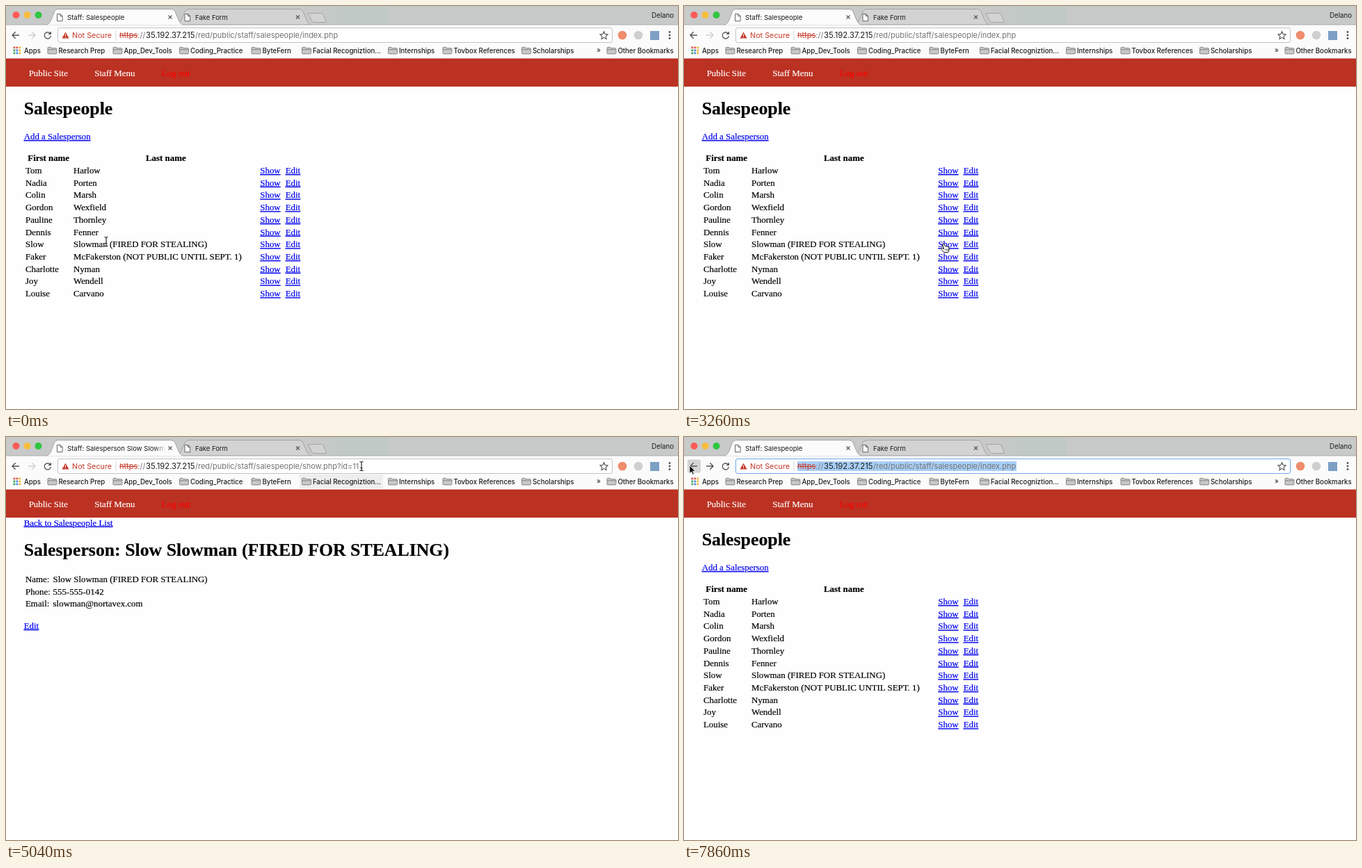
An HTML page for the animation above (8 s loop, 966 by 580 pixels).

```html
<!DOCTYPE html>
<html lang="en">
<head>
<meta charset="utf-8">
<title>Staff: Salespeople</title>
<style>
html, body { margin: 0; width: 100%; height: 100%; overflow: hidden; background: #fefefe; }
svg { display: block; width: 100vw; height: 100vh; }
text { white-space: pre; }
.ui { font-family: Inter, "Open Sans", sans-serif; fill: #1c1c1c; }
.page { font: 12.9px "Liberation Serif", "Times New Roman", serif; fill: #000; }
.page text { stroke: #000; stroke-width: .18px; }
.page .h1 { font-size: 25.8px; font-weight: bold; }
.page .th { font-weight: bold; }
.page .link { fill: #0000ee; stroke: #0000ee; text-decoration: underline; }
.page .nav { fill: #fff; stroke: #fff; }
.page .out { fill: #f00; stroke: #f00; }
</style>
</head>
<body>
<svg id="stage" viewBox="0 0 966 580" xmlns="http://www.w3.org/2000/svg"></svg>
<script>
const LOOP = 8000;
const stage = document.getElementById('stage');
const el = id => document.getElementById(id);

// Markup helpers
const rect = (x, y, w, h, fill, extra = '') =>
  `<rect x="${x}" y="${y}" width="${w}" height="${h}" fill="${fill}" ${extra}/>`;
const path = (d, extra = '') => `<path d="${d}" ${extra}/>`;
const dot = (x, y, r, fill) => `<circle cx="${x}" cy="${y}" r="${r}" fill="${fill}"/>`;
const text = (x, y, s, cls = '') => `<text x="${x}" y="${y}" class="${cls}">${s}</text>`;
const ui = (x, y, s, size, extra = '') =>
  `<text class="ui" x="${x}" y="${y}" font-size="${size}" ${extra}>${s}</text>`;
const group = (id, body, extra = '') => `<g id="${id}" ${extra}>${body}</g>`;
const line = (color, width = 1.2) => `fill="none" stroke="${color}" stroke-width="${width}"`;

const fileIcon = x => path(`M${x} 11.5h4.6l3 3v7.2h-7.6z M${x + 4.6} 11.5v3h3`,
  'fill="#fff" stroke="#555" stroke-width=".9"');
const closeIcon = x => path(`M${x - 2.5} 13.5l5 5m0-5l-5 5`, line('#555', 1.1));
const folder = x => path(`M${x} 60.5q0-1.2 1.2-1.2h3.3l1.2 1.4h6q1.2 0 1.2 1.2v6q0 1-1.2 1h-10.5q-1.2 0-1.2-1z
  M${x} 62.8h12.9`, 'fill="#c9c9c9" stroke="#7c7c7c" stroke-width=".9"');
const arrowIcon = (x, dir) =>
  path(`M${x - 5 * dir} 42h${10 * dir}m${-4.7 * dir}-4.7l${4.7 * dir} 4.7l${-4.7 * dir} 4.7`);

function tabStrip() {
  const lights = ['#fc5b57', '#f6be3b', '#2fc641'].map((c, i) => dot(14.5 + 16 * i, 13, 5, c)).join('');
  return rect(0, 0, 966, 28, '#c8c9c9') +
    rect(440, 0, 110, 27, 'url(#tint)') + lights +
    path('M244 27C249 27 250 24 252 20L257 8Q259 4.500 263 4.500H421Q425 4.500 427 8L432 20Q435 27 440 27Z',
      'fill="#d3d3d3" stroke="#a3a3a3"') +
    path('M436 10.500H453Q455 10.500 456 12L460 21.500Q461 23.500 459 23.500H443Q441 23.500 440 22L434.500 12Q434 10.500 436 10.500Z',
      'fill="#d3d3d3" stroke="#a3a3a3"') +
    rect(0, 26.5, 966, 1, '#a9a9a9') +
    path('M56 28C61 27 63 24 65 20L69.500 8Q71 4.500 75 4.500H237Q241 4.500 243 8L248 20Q251 27 257 28Z',
      'fill="#fbfbfb" stroke="#a3a3a3"') +
    fileIcon(73.5) + fileIcon(257) +
    `<g clip-path="url(#tabClip)">${ui(88, 19.6, '', 9.6, 'id="title"')}</g>` +
    rect(214, 9, 15, 15, 'url(#fade)') +
    ui(272, 19.6, 'Fake Form', 9.5) + closeIcon(236) + closeIcon(419.5) +
    ui(960, 17.2, 'Delano', 9.7, 'text-anchor="end"');
}

function toolbar() {
  return rect(0, 27.5, 966, 48.5, '#fbfbfb') +
    group('backHover', rect(5, 32.5, 19, 19, '#d4d4d4', 'rx="2"')) +
    group('back', arrowIcon(14, -1), line('#555', 1.4)) +
    group('forward', arrowIcon(37, 1), line('#555', 1.4)) +
    path('M63.300 39.300A4.600 4.600 0 1 0 64.400 43', line('#555', 1.4)) +
    path('M65 36.500v4.600h-4.600z', 'fill="#555"') +
    rect(74.5, 31.5, 797, 21, '#fff', 'id="field" rx="2.500" stroke="#c2c2c2"') +
    group('idSel', rect(498, 35, 10.5, 14, '#a9cff7')) +
    group('urlSel', rect(163, 35, 315, 14, '#a9cff7')) +
    path('M85.500 37.500l5 9h-10z', 'fill="#c53929"') +
    path('M85.500 40.500v3m0 1v1', line('#fff', 1)) +
    ui(95, 46, 'Not Secure', 10.8, 'style="fill:#c53929"') +
    rect(157.5, 35, 1, 14, '#d6d6d6') +
    ui(163, 46, '<tspan fill="#c53929" text-decoration="line-through">https</tspan><tspan fill="#777">://</tspan>', 11) +
    ui(201, 46, '35.192.37.215', 11.3) +
    ui(272, 46, '', 11, 'id="url" style="fill:#737373"') +
    path('M859.500 36.700l1.600 3.700 4 .4-3 2.700.9 4-3.500-2.100-3.500 2.100.9-4-3-2.700 4-.4z', line('#555', 1.1)) +
    dot(886, 42, 6.3, '#ee8c6b') + dot(909, 42, 6.3, '#cfcfcf') +
    rect(926, 36, 13, 13, '#7d9fc4') +
    [37.5, 42, 46.5].map(y => dot(954, y, 1.4, '#555')).join('');
}

function bookmarks() {
  const items = [
    [60, 'Research Prep'], [154, 'App_Dev_Tools'], [249.5, 'Coding_Practice'], [353, 'ByteFern'],
    [425.5, 'Facial Recogniztion...'], [549.5, 'Internships'], [628, 'Tovbox References'],
    [741.5, 'Scholarships'], [864, 'Other Bookmarks']
  ];
  const colors = ['#e2574c', '#e2574c', '#f2b632', '#3aa757', '#4a86e8', '#f2b632', '#3aa757', '#4a86e8', '#f2b632'];
  const grid = colors.map((c, i) => rect(10.5 + i % 3 * 4, 58.5 + (i / 3 | 0) * 4, 2.7, 2.7, c)).join('');
  const style = 'font-weight="500"';
  return group('markHover', rect(422, 54, 120, 20, '#eeeeee')) + grid +
    ui(26, 67.6, 'Apps', 9.65, style) +
    items.map(([x, s]) => folder(x) + ui(x + 15.4, 67.6, s, 9.65, style)).join('') +
    ui(849, 67, '»', 10);
}

const nav = () => rect(0, 75.5, 966, 40.5, '#bb3122') +
  text(32.7, 101, 'Public Site', 'nav') + text(127.3, 101, 'Staff Menu', 'nav') + text(224, 101, 'Log out', 'out');

const people = [
  ['Tom', 'Harlow'], ['Nadia', 'Porten'], ['Colin', 'Marsh'], ['Gordon', 'Wexfield'],
  ['Pauline', 'Thornley'], ['Dennis', 'Fenner'], ['Slow', 'Slowman (FIRED FOR STEALING)'],
  ['Faker', 'McFakerston (NOT PUBLIC UNTIL SEPT. 1)'], ['Charlotte', 'Nyman'],
  ['Joy', 'Wendell'], ['Louise', 'Carvano']
];
const ROW = 17.72, TOP = 228.1;
const COLS = [28, 97, 365.3, 401.7];

function listPage() {
  const rows = people.map((names, i) => [...names, 'Show', 'Edit'].map((s, c) =>
    text(COLS[c], 241 + i * ROW, s, c > 1 ? 'link' : '')).join('')).map((cells, i) => group('row' + i, cells));
  return group('marks', '') +
    text(25.7, 156.3, 'Salespeople', 'h1') + text(25.7, 192, 'Add a Salesperson', 'link') +
    text(31.3, 223, 'First name', 'th') + text(201, 223, 'Last name', 'th') + rows.join('');
}

function detailPage() {
  const who = 'Slow Slowman (FIRED FOR STEALING)';
  const rows = [['Name:', who], ['Phone:', '555-555-0142'], ['Email:', 'slowman@nortavex.com']];
  return text(25.7, 127.6, 'Back to Salespeople List', 'link') +
    text(25.7, 171, 'Salesperson: ' + who, 'h1') +
    rows.map(([k, v], i) => text(28, 208.8 + i * ROW, k) + text(67.6, 208.8 + i * ROW, v)).join('') +
    text(25.7, 275.8, 'Edit', 'link');
}

const statusBar = () => path('M-1 566.500H320Q322.500 566.500 322.500 569V581H-1Z', 'fill="#fff" stroke="#b4b4b4"') +
  ui(3, 576.3, 'Waiting for 35.192.37.215...', 8.9, 'font-weight="500"');

const beam = 'M-2.500-6.500Q0-6.500 0-5Q0-6.500 2.500-6.500M0-5V5M-2.500 6.500Q0 6.500 0 5Q0 6.500 2.500 6.500M-1.500 2.500H1.500';
const pointers = {
  beam: path(beam, line('#fff', 2.4)) + path(beam, line('#111', 1.1)),
  arrow: path('M0 0V11.500L2.700 9L4.600 13.300L6.500 12.500L4.600 8.300H8.200Z', 'fill="#000" stroke="#fff" stroke-width=".9"'),
  hand: path('M-3.500-5.500Q-2-7-1-5L.5-2Q1.500-3.200 2.300-1.800Q3.600-2.600 4.200-1.100Q5.800-1.600 6 0L6 3.500L4.700 6.500H-1.500L-5.500 1.500Q-6-.5-3.500 .5L-1.500 1.800Z',
    'fill="#fff" stroke="#111" stroke-linejoin="round"') +
    path('M.8 1.500V4M2.700 1.500V4M4.500 1.500V4', line('#111', .7))
};

stage.innerHTML = `<defs>
  <linearGradient id="fade"><stop offset="0" stop-color="#fbfbfb" stop-opacity="0"/><stop offset="1" stop-color="#fbfbfb"/></linearGradient>
  <linearGradient id="tint"><stop offset="0" stop-color="#c1c9c7" stop-opacity="0"/><stop offset=".4" stop-color="#c1c9c7"/></linearGradient>
  <clipPath id="tabClip"><rect x="86" y="6" width="143" height="20"/></clipPath></defs>` +
  rect(0, 0, 966, 580, '#fefefe') + tabStrip() + toolbar() + bookmarks() +
  group('body', nav() + group('list', listPage()) + group('detail', detailPage()), 'class="page"') +
  group('status', statusBar()) +
  Object.entries(pointers).map(([k, v]) => group(k, v)).join('');

// Pointer stops spread over a time span, on a 10 ms clock
const run = (from, to, kind, stops) => stops.map(([x, y, k = kind], i) =>
  ({ at: Math.floor((from + (to - from) * i / (stops.length - 1)) / 10) * 10, x, y, kind: k }));
const moves = [
  { at: 0, x: 144, y: 339, kind: 'beam' },
  ...run(150, 1180, 'beam', [[168, 345], [215, 350], [230, 351], [196, 348], [128, 343], [70, 339], [38, 338], [32, 338]]),
  ...run(1480, 2510, 'beam', [[42, 338], [58, 333], [125, 341], [210, 348], [272, 354],
    [303.5, 352, 'arrow'], [322, 350, 'arrow'], [340, 349, 'arrow']]),
  ...run(3110, 4150, 'hand', [[368, 348], [375, 348], [375, 348], [375, 348], [375, 348],
    [382, 310, 'arrow'], [410, 210, 'arrow'], [432, 126, 'arrow']]),
  ...run(4300, 5330, 'arrow', [[446, 106], [464, 80], [484, 63], [500, 48, 'beam'], [508, 43, 'beam'],
    [511, 42, 'beam'], [511, 42, 'beam'], [510, 42, 'beam']]),
  ...run(5480, 5630, 'beam', [[507, 42], [504, 42]]),
  ...run(5920, 6520, 'beam', [[420, 46], [270, 42], [130, 24, 'arrow'], [58, 3, 'arrow'], [0, 0, 'none']]),
  ...run(7260, 7860, 'arrow', [[1, 34], [8, 41], [8, 41], [8, 41], [8, 41]])
];

// Text selection dragged from the anchor to the pointer, cell by cell
const anchor = { x: 36, row: 6 };
function selection(pointer) {
  const focus = { x: pointer.x, row: Math.floor((pointer.y - TOP) / ROW) };
  const [a, b] = focus.row < anchor.row ? [focus, anchor] : [anchor, focus];
  let marks = '';
  for (let r = a.row; r <= b.row; r++) {
    const from = r === a.row ? a.x : 0, to = r === b.row ? b.x : Infinity;
    [...el('row' + r).children].forEach((cell, c) => {
      const end = COLS[c] + cell.getComputedTextLength();
      const right = to > (COLS[c + 1] || 430) ? end + 4 : Math.min(end, to);
      const left = Math.max(COLS[c], from);
      if (right > left) marks += rect(left, TOP + r * ROW + 1.6, right - left, 14.5, '#b2d6fc');
    });
  }
  return marks;
}

const show = (id, on) => el(id).setAttribute('visibility', on ? 'visible' : 'hidden');

function draw(t) {
  const detail = t >= 3700 && t < 7710;
  const titled = t >= 3850 && t < 7710;
  const returned = t >= 7710;
  const now = moves.filter(m => m.at <= t).pop();

  show('list', !detail);
  show('detail', detail);
  show('status', t >= 3400 && t < 4000);
  el('marks').innerHTML = t >= 1480 && t < 3110 ? selection(now) : '';
  el('title').textContent = titled ? 'Staff: Salesperson Slow Slowman' : 'Staff: Salespeople';
  el('url').textContent = '/red/public/staff/salespeople/' + (detail ? 'show.php?id=11' : 'index.php');

  el('field').setAttribute('stroke', t >= 5180 ? '#6fa8e8' : '#c2c2c2');
  show('idSel', t >= 5480 && !returned);
  show('urlSel', returned);
  show('markHover', t >= 4590 && t < 7410);
  show('backHover', t >= 7410);
  el('forward').setAttribute('stroke', returned ? '#555' : '#cfcfcf');

  for (const k in pointers) {
    show(k, k === now.kind);
    el(k).setAttribute('transform', `translate(${now.x} ${now.y})`);
  }
}

function tick() {
  draw(performance.now() % LOOP);
  requestAnimationFrame(tick);
}
tick();
</script>
</body>
</html>
```
